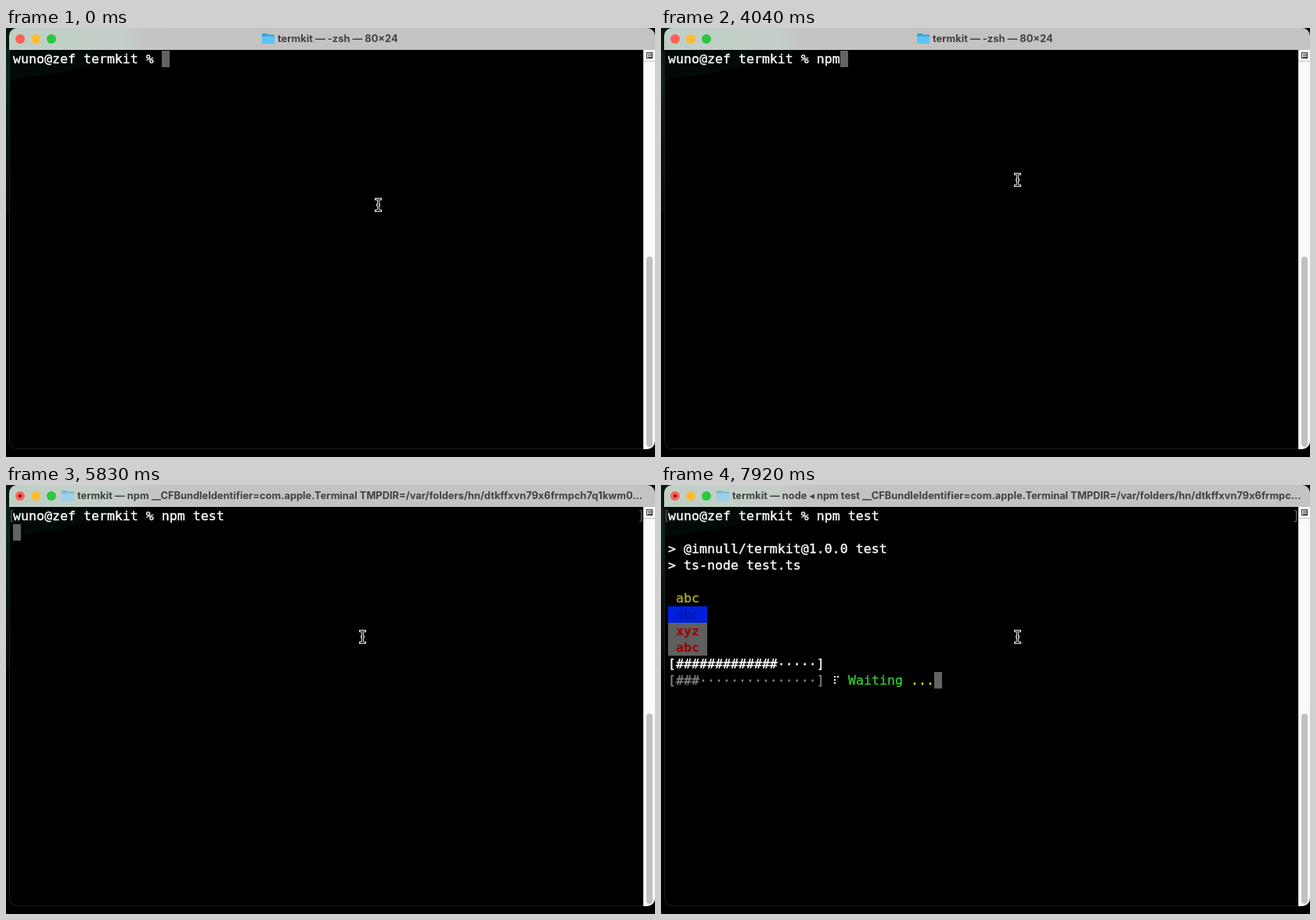
These frames come from a looping animation (829 by 548 pixels, 8 s). An HTML page with a canvas:

```html
<!DOCTYPE html>
<html lang="en">
<head>
<meta charset="utf-8">
<title>Terminal session</title>
<style>
  html, body { margin: 0; width: 100%; height: 100%; overflow: hidden; background: #000; }
  canvas { display: block; width: 829px; height: 548px; }
</style>
</head>
<body>
<canvas id="stage" width="829" height="548"></canvas>
<script>
const ctx = document.getElementById('stage').getContext('2d');
const LOOP = 8000;
const CELL_W = 10, CELL_H = 21, LEFT = 9, TOP = 29;
const MONO = '16.6px "DejaVu Sans Mono", monospace';
const TITLE_FONT = '700 12.85px Inter, "DejaVu Sans", sans-serif';

const PROMPT = 'wuno@zef termkit % ';
const COMMAND = 'npm test';
const KEY_TIMES = [2990, 3740, 4040, 4190, 4630, 4780, 4930, 5080];
const ENTER = 5680, NPM_TITLE = 5830, BANNER = 6120, NODE_TITLE = 6270, COLORS = 6870, WAITING = 7020;
const POINTER = [[0, 475.5, 226], [440, 475.5, 221], [590, 488.5, 197], [740, 466.5, 196], [890, 455.5, 194]];
const SPINNER = '⠋⠙⠹⠸⠼⠴⠦⠧⠇⠏';
const DOTS = ['', '.', '..', '...', ' ..', '  .'];
const ENVIRONMENT = '__CFBundleIdentifier=com.apple.Terminal TMPDIR=/var/folders/hn/dtkffxvn79x6frmp';

const colX = col => LEFT + col * CELL_W;
const rowY = row => TOP + row * CELL_H;

function rect(x, y, w, h, color) {
  ctx.fillStyle = color;
  ctx.fillRect(x, y, w, h);
}

function rounded(x, y, w, h, radii, color) {
  ctx.fillStyle = color;
  ctx.beginPath();
  ctx.roundRect(x, y, w, h, radii);
  ctx.fill();
}

function disc(x, y, r, color) {
  ctx.fillStyle = color;
  ctx.beginPath();
  ctx.arc(x, y, r, 0, 2 * Math.PI);
  ctx.fill();
}

function gradient(x, y, stops) {
  const g = ctx.createLinearGradient(0, 0, x, y);
  stops.forEach(([at, color]) => g.addColorStop(at, color));
  return g;
}

// A thin outline gives the regular weight its slightly heavy look.
function print(text, row, col = 0, color = '#fff', weight = 'normal') {
  const x = colX(col), y = rowY(row) + 16.4;
  ctx.font = weight + ' ' + MONO;
  ctx.fillStyle = ctx.strokeStyle = color;
  ctx.fillText(text, x, y);
  if (weight === 'normal') {
    ctx.lineWidth = .35;
    ctx.strokeText(text, x, y);
  }
}

function block(row, col, count, color) {
  rect(colX(col), rowY(row), count * CELL_W, CELL_H, color);
}

const bar = filled => '[' + '#'.repeat(filled) + '·'.repeat(18 - filled) + ']';

function drawWindow() {
  rect(0, 0, 829, 548, '#000');
  rect(0, 0, 12, 236, gradient(0, 236, [[0, '#06150f'], [.25, '#07291d'], [.6, '#04150f'], [1, '#070807']]));
  rounded(4, 0, 825, 538, 10, '#1c1c1c');
  rounded(5, 10, 823, 527, 9, '#000');

  // faint glow of the desktop through the window
  ctx.fillStyle = '#010a06';
  ctx.beginPath();
  ctx.moveTo(5, 28);
  ctx.lineTo(172, 28);
  ctx.quadraticCurveTo(110, 54, 5, 66);
  ctx.fill();

  rounded(4, 0, 825, 28, [10, 10, 0, 0],
    gradient(829, 0, [[0, '#bfd0c6'], [.18, '#c5cec8'], [.21, '#c5c7c4'], [.25, '#c4c3c2'], [1, '#c4c3c2']]));

  rounded(814, 28, 15, 510, [0, 0, 10, 0], '#fafafa');
  rect(814, 28, 1, 510, '#e4e4e4');
  rect(814, 42, 15, 1, '#c4c4c4');
  rounded(818, 292, 8, 243, 4, '#c1c1c1');
  ctx.strokeStyle = '#333';
  ctx.lineWidth = 1;
  ctx.strokeRect(818.5, 31.5, 7, 7);
  for (const y of [33, 35, 37]) rect(820, y, 5, 1, '#333');
}

function drawFolder(x, busy) {
  const back = busy ? '#7fb6d4' : '#2f9fd8';
  rounded(x, 7, 7, 5, 1.5, back);
  rounded(x, 8.5, 16, 11.5, 1.5, back);
  rounded(x, 10.5, 16, 9.5, 1.5, busy ? '#9bd0ea' : '#5ec5f3');
}

function drawTitle(t) {
  const busy = t >= NPM_TITLE;
  ['#ff5f57', '#febc2e', '#28c840'].forEach((color, i) => disc(18 + 20 * i, 14, 6, color));
  if (busy) disc(18, 14, 2, '#6b0f0b');

  let title = 'termkit — -zsh — 80×24';
  if (t >= NODE_TITLE) title = `termkit — node ◂ npm test ${ENVIRONMENT}c...`;
  else if (busy) title = `termkit — npm ${ENVIRONMENT}ch7q1kwm0...`;
  const x = busy ? 71 : 327;
  drawFolder(x, busy);
  ctx.font = TITLE_FONT;
  ctx.fillStyle = '#414140';
  ctx.fillText(title, x + 20, 18);
}

function drawMarks() {
  ctx.strokeStyle = '#6c6c6c';
  ctx.lineWidth = 1;
  ctx.beginPath();
  for (const [edge, tip] of [[6.5, 9], [811.5, 809]]) {
    ctx.moveTo(tip, 32.5);
    ctx.lineTo(edge, 32.5);
    ctx.lineTo(edge, 46.5);
    ctx.lineTo(tip, 46.5);
  }
  ctx.stroke();
}

function drawColors() {
  print(' abc', 5, 0, '#aeaa25');
  block(6, 0, 5, '#0021dc');
  print(' abc', 6, 0, '#0012b0');
  block(7, 0, 5, '#5f5f5f');
  print(' xyz', 7, 0, '#9c0000', 'bold');
  block(8, 0, 5, '#5f5f5f');
  print(' abc', 8, 0, '#9c0000', 'bold');
  print(bar(13), 9);
}

function drawSpinner(glyph) {
  const bits = glyph.charCodeAt(0);
  for (let i = 0; i < 6; i++) {
    if (bits >> i & 1) rect(221 + 4 * Math.floor(i / 3), 244 + 4 * (i % 3), 2, 2, '#f4f4f4');
  }
}

// The 100 ms spinner is seen in steps of 150 ms.
function drawWaiting(t) {
  const step = Math.floor((t - WAITING) / 150);
  const tick = Math.floor(step * 1.5 + .5);
  print(bar(Math.floor(step / 2)), 10, 0, '#828282');
  drawSpinner(SPINNER[tick % SPINNER.length]);
  print('Waiting', 10, 23, '#2fca2d');
  print(DOTS[tick % DOTS.length], 10, 31, '#e6e32f');
}

function drawSession(t) {
  const typed = KEY_TIMES.filter(time => t >= time).length;
  let row = 0, col = PROMPT.length + typed;
  if (t >= ENTER) {
    row = t >= COLORS ? 10 : t >= BANNER ? 5 : 1;
    col = t >= WAITING ? 34 : 0;
    drawMarks();
  }
  print(PROMPT + COMMAND.slice(0, typed), 0);
  if (t >= BANNER) {
    print('> @imnull/termkit@1.0.0 test', 2);
    print('> ts-node test.ts', 3);
  }
  if (t >= COLORS) drawColors();
  if (t >= WAITING) drawWaiting(t);
  block(row, col, 1, '#636363');
}

function drawPointer(t) {
  const [, x, y] = POINTER.filter(([time]) => t >= time).pop();
  const beam = new Path2D('M-3-7.5H-2Q0-7.5 0-5.5Q0-7.5 2-7.5H3M0-5.5V5.5M-3 7.5H-2Q0 7.5 0 5.5Q0 7.5 2 7.5H3M-1 0H1');
  ctx.save();
  ctx.translate(x, y);
  ctx.lineCap = 'square';
  for (const [width, color] of [[3, '#f2f2f2'], [1.1, '#000']]) {
    ctx.lineWidth = width;
    ctx.strokeStyle = color;
    ctx.stroke(beam);
  }
  ctx.restore();
}

function draw() {
  const t = performance.now() % LOOP;
  drawWindow();
  drawTitle(t);
  drawSession(t);
  drawPointer(t);
  requestAnimationFrame(draw);
}
draw();
</script>
</body>
</html>
```
